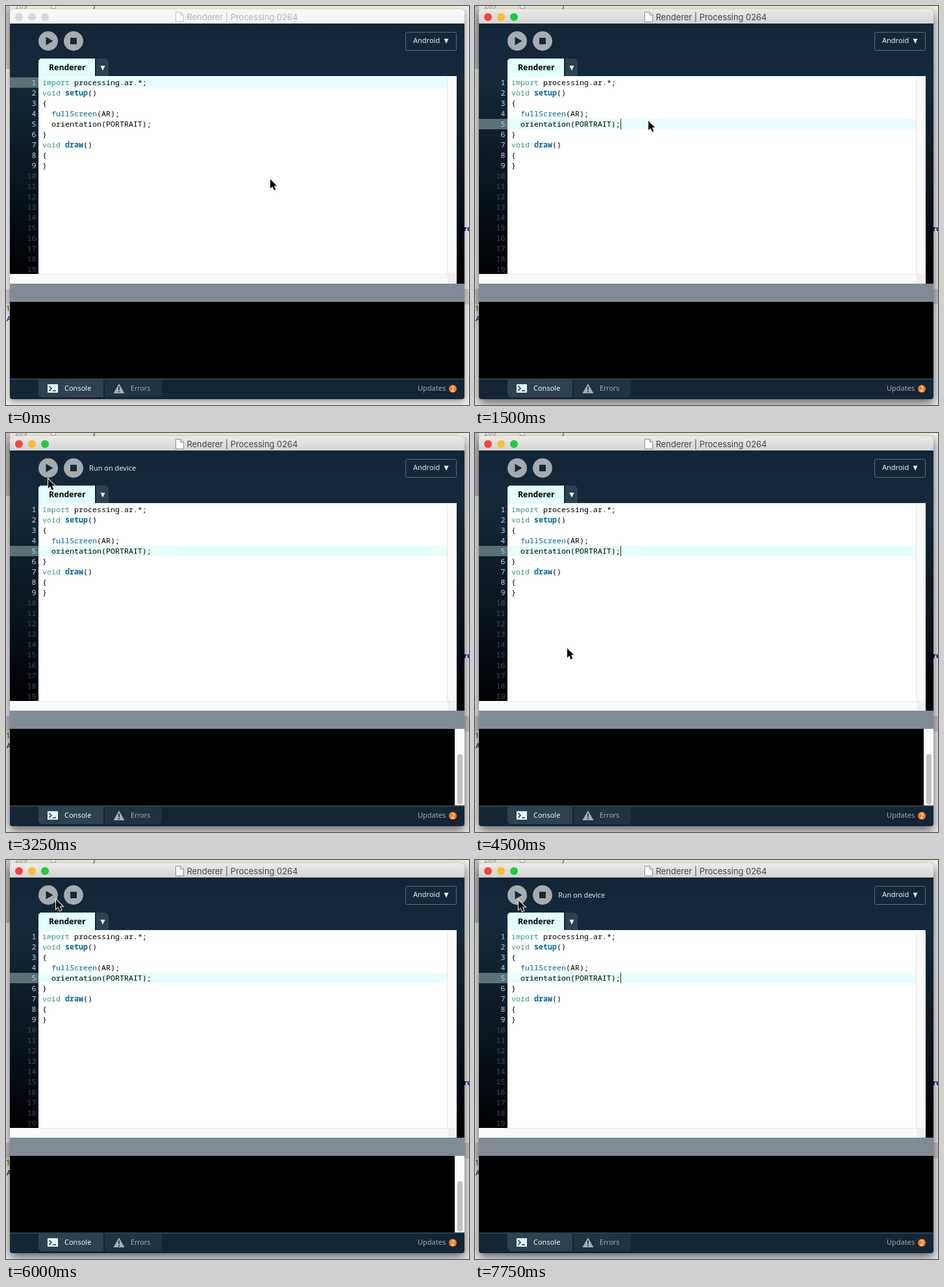
Write an HTML page that moves like this. It is 713 px wide and 615 px high and loops after 8000 ms.

```html
<!DOCTYPE html>
<html lang="en">
<head>
<meta charset="utf-8">
<title>Sketch editor</title>
<style>
  html, body { margin: 0; width: 100%; height: 100%; overflow: hidden; background: #efefef; }
  svg { display: block; width: 713px; height: 615px; }
  text { font: 500 11px "Noto Sans", sans-serif; white-space: pre; }
  .code text { font: 11.67px "Noto Sans Mono", monospace; fill: #000; }
  .code .number { text-anchor: end; fill: #c7d4d8; }
  .code .empty { fill: #3d4d58; }
  .keyword { fill: #33997e; }
  .call { fill: #006699; }
  .bold { font-weight: 700; }
  #title { font: 12.9px Inter, sans-serif; }
</style>
</head>
<body>
<svg viewBox="0 0 713 615">
  <defs>
    <linearGradient id="navy" gradientUnits="userSpaceOnUse" x1="0" y1="27" x2="0" y2="428">
      <stop stop-color="#122638"/>
      <stop offset=".2" stop-color="#142939"/>
      <stop offset=".65" stop-color="#09131c"/>
      <stop offset=".95" stop-color="#000104"/>
    </linearGradient>
    <linearGradient id="metal" x2="0" y2="1">
      <stop stop-color="#ebebeb"/>
      <stop offset="1" stop-color="#d3d3d3"/>
    </linearGradient>
  </defs>

  <!-- window behind -->
  <rect width="713" height="615" fill="#ececec"/>
  <path d="M8 0H713V6H8z" fill="#f5f2dc"/>
  <path d="M0 0H6V97H0z" fill="#bebebe"/>
  <path d="M0 436H713V460H0z" fill="#cacaca"/>
  <text x="14" y="4" fill="#999">209</text>
  <path d="M69.500 0V3.500H76.500V0" fill="#fff" stroke="#aaa"/>
  <text x="134" y="3" fill="#333">}</text>
  <text x="705" y="347" fill="#000080" class="bold">ru</text>
  <path d="M0 461H6V473H0z" fill="#dfe4cd"/>
  <text x="-5" y="470" fill="#2c4a22">_1</text>
  <text x="1" y="486" fill="#00004d" font-style="italic">A</text>

  <!-- editor window -->
  <rect id="frame" x="6" y="5" width="700" height="601" rx="4" fill="#142635"/>
  <path id="titleBar" d="M6 27V9q0-4 4-4H702q4 0 4 4V27z"/>
  <g id="lights"></g>
  <g id="document">
    <path d="M261.500 9.500H269L273.500 14V24.500H261.500z" fill="#fff" stroke="#8b8b8b"/>
    <path d="M269 9.500V14H273.500" fill="#ddd" stroke="#8b8b8b"/>
  </g>
  <text id="title" x="278.500" y="22">Renderer | Processing 0264</text>
  <path d="M6 27H706V428H6z" fill="url(#navy)"/>

  <!-- toolbar and tabs -->
  <g fill="#a5abaf"><circle cx="65" cy="54" r="15"/><circle cx="104" cy="54" r="15"/></g>
  <path d="M61.500 47.500L72.500 54L61.500 60.500zM99 49H109V59H99z" fill="#142839"/>
  <text id="tip" x="128" y="58" fill="#e3eef0">Run on device</text>
  <rect x="615.500" y="40.500" width="78" height="28" rx="2" fill="#142839" stroke="#596c79"/>
  <text x="627" y="57" fill="#e3f3f3">Android</text>
  <path d="M674.500 50.500H681.500L678 58z" fill="#e3f3f3"/>
  <path d="M50 109V84l3-3H137V108H694V109z" fill="#e0fffd"/>
  <text x="66" y="99" style="font-size:12.3px;font-weight:600">Renderer</text>
  <path d="M139 81H154l4 4V108H139z" fill="#2d4251"/>
  <path d="M145.500 92H152.500L149 99.500z" fill="#e0fffd"/>

  <!-- text area -->
  <path d="M50 109H694V413H50z" fill="#fff"/>
  <g id="row">
    <path d="M6 110H50V126H6z" fill="#587276"/>
    <path d="M50 110H679V126H50z" fill="#e6fffd"/>
  </g>
  <path d="M679 109H694V428H6V413H679z" fill="#fafafa"/>
  <path d="M679.500 109V413M50 413.500H694" stroke="#e6e9e8" fill="none"/>
  <path d="M680 414H694V428H680z" fill="#f0f0f0"/>
  <g id="code" class="code"></g>
  <path id="caret" d="M224.500 174V190" stroke="#2b2b00"/>

  <!-- status, console, footer -->
  <path d="M6 428H706V456H6z" fill="#818b95"/>
  <path d="M6 456H706V574H6z"/>
  <g id="scrollbar">
    <path d="M691 456H706V574H691z" fill="#fafafa"/>
    <rect x="695" y="495" width="8" height="78" rx="4" fill="#c1c1c1"/>
  </g>
  <path d="M6 574H706V576H6z" fill="#2a404e"/>
  <path d="M50 576H150V603H54l-4-4z" fill="#2c4251"/>
  <path d="M152 576H240V599l-4 4H152z" fill="#1f3342"/>
  <path d="M64 583H80V596H64z" fill="#e0fffd"/>
  <path d="M66.500 586L70 589.500L66.500 593M72 593H77" fill="none" stroke="#203746" stroke-width="1.600"/>
  <text x="90" y="593" fill="#e0fffd">Console</text>
  <path d="M174 582L182.500 597H165.500z" fill="#a5afb4"/>
  <path d="M174 586.500V592M174 593.500V595.500" stroke="#1f3342" stroke-width="1.800"/>
  <text x="192" y="593" fill="#a0adb2" style="font-size:10.6px">Errors</text>
  <text x="634" y="593" fill="#a0adb2">Updates</text>
  <circle cx="688" cy="590" r="6" fill="#ee7f21"/>
  <text x="688" y="594" fill="#fff" text-anchor="middle" style="font-size:10px">2</text>

  <path id="cursor" d="M0 0V14.200L3.300 11.200L5.800 17L8.300 15.900L5.900 10.300H10.200z"
    stroke="#fff" stroke-width="2" paint-order="stroke"/>
</svg>

<script>
const byId = id => document.getElementById(id);
const DURATION = 8000, STEP = 250;

const lines = [
  '<tspan class="keyword">import</tspan> processing.ar.*;',
  '<tspan class="keyword">void</tspan> <tspan class="call bold">setup</tspan>()',
  '{',
  '  <tspan class="call">fullScreen</tspan>(AR);',
  '  orientation(PORTRAIT);',
  '}',
  '<tspan class="keyword">void</tspan> <tspan class="call bold">draw</tspan>()',
  '{',
  '}'
];
byId('code').innerHTML = Array.from({ length: 19 }, (_, i) => {
  const y = 122 + 16 * i;
  return `<text class="number ${i < lines.length ? '' : 'empty'}" x="46.500" y="${y}">${i + 1}</text>` +
    `<text x="56" y="${y}">${lines[i] || ''}</text>`;
}).join('');

const lights = ['#fd3f3b', '#fdbd2c', '#1fcb3e'].map((color, i) => {
  const light = document.createElementNS('http://www.w3.org/2000/svg', 'circle');
  light.setAttribute('cx', 20 + 20 * i);
  light.setAttribute('cy', 17);
  light.setAttribute('r', 6);
  byId('lights').append(light);
  return { light, color };
});

// time, x, y: the pointer jumps once per step
const pointer = [
  [0, 407, 267], [250, 443, 250], [500, 300, 171], [750, 267, 177],
  [1750, 240, 160], [2000, 150, 110], [2250, 75, 80], [2500, 51, 66],
  [2750, 58, 67], [3000, 64, 70], [3250, 65, 71], [3500, 62, 71],
  [4000, 66, 90], [4250, 110, 230], [4500, 142, 332], [4750, 150, 430],
  [5000, 142, 400], [5250, 135, 350], [5500, 115, 230], [5750, 92, 120],
  [6000, 77, 61], [6250, 70, 58], [6500, 67, 62]
];

const show = (id, on) => byId(id).setAttribute('visibility', on ? 'visible' : 'hidden');
const within = (t, from, to) => t >= from && t < to;

function render(t) {
  const active = t >= 1500;
  byId('titleBar').setAttribute('fill', active ? 'url(#metal)' : '#f6f6f6');
  byId('title').setAttribute('fill', active ? '#454545' : '#b2b2b2');
  byId('document').setAttribute('opacity', active ? 1 : .5);
  byId('frame').style.filter = active
    ? 'drop-shadow(0 6px 8px #0009)' : 'drop-shadow(0 3px 5px #0006)';
  for (const { light, color } of lights) light.setAttribute('fill', active ? color : '#d9d9d9');
  byId('row').setAttribute('transform', `translate(0 ${active ? 64 : 0})`);
  show('caret', active && (t - 1500) % 1000 < 500);
  show('tip', within(t, 2500, 4000) || t >= 6250);
  show('scrollbar', within(t, 2750, 7250));
  const [, x, y] = pointer.findLast(key => key[0] <= t);
  byId('cursor').setAttribute('transform', `translate(${x} ${y})`);
}

const start = performance.now();
function tick() {
  const t = (performance.now() - start) % DURATION;
  render(Math.floor(t / STEP) * STEP);
  requestAnimationFrame(tick);
}
tick();
</script>
</body>
</html>
```
